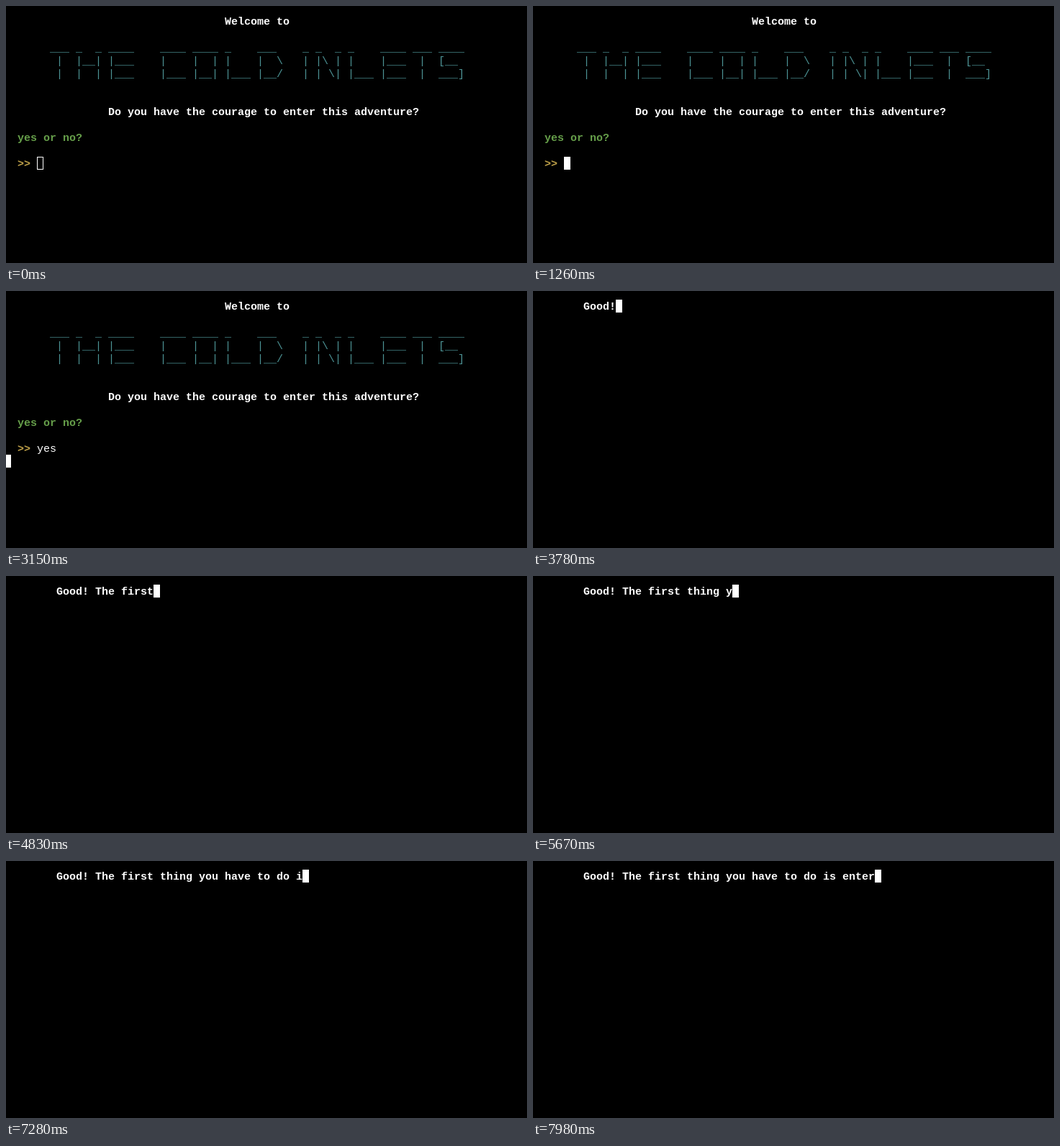
Recreate the animation shown at these times as an HTML page. Size 724x358 px, loop 8000 ms.

```html
<!DOCTYPE html>
<html lang="en">
<head>
<meta charset="utf-8">
<title>Terminal adventure</title>
<style>
  html, body { margin: 0; width: 100%; height: 100%; overflow: hidden; background: #000; }
  svg { display: block; }
  text { font: 15px "Liberation Mono", monospace; white-space: pre; fill: #fff; }
  .bold, .green, .yellow { font-weight: bold; }
  .title { fill: #4c9294; }
  .green { fill: #669f4a; }
  .yellow { fill: #bd9f48; }
</style>
</head>
<body>
<svg id="stage" width="724" height="358" viewBox="0 0 724 358">
  <rect width="724" height="358" fill="#000"/>
  <g id="welcome"><g id="banner" transform="translate(0 1)"></g></g>
  <g id="story"></g>
  <rect id="cursor" stroke="#fff" width="8" height="17"/>
  <path id="pointer" d="M54.5 214.5V229.5L58 226.3L60.4 231.5L62.8 230.4L60.5 225.4H65.5Z"
        fill="#000" stroke="#fff"/>
</svg>
<script>
const LOOP = 8000, CELL_W = 9, CELL_H = 18, LEFT = -2, TOP = 12;
const INDENT = 8;
const STORY = 'Good! The first thing you have to do is enter';

// Moments of the prompt dialogue, in ms
const FOCUS = 1260, POINTER_IN = 1540, POINTER_OUT = 2310;
const KEYS = [2380, 2590, 2940];
const ENTER = 3150, CLEAR = 3220;

// Three rows per banner letter
const GLYPHS = {
  T: ['___', ' | ', ' | '],
  H: ['_  _', '|__|', '|  |'],
  E: ['____', '|___', '|___'],
  C: ['____', '|   ', '|___'],
  O: ['____', '|  |', '|__|'],
  L: ['_   ', '|   ', '|___'],
  D: ['___ ', '|  \\', '|__/'],
  I: ['_', '|', '|'],
  N: ['_  _', '|\\ |', '| \\|'],
  S: ['____', '[__ ', '___]']
};

const byId = id => document.getElementById(id);
const cellX = col => LEFT + col * CELL_W;
const cellY = row => TOP + row * CELL_H;
const show = (node, on) => node.setAttribute('display', on ? 'inline' : 'none');

function print(parent, col, row, content, style = '') {
  const node = document.createElementNS('http://www.w3.org/2000/svg', 'text');
  node.setAttribute('x', cellX(col));
  node.setAttribute('y', cellY(row) + 14);
  node.setAttribute('class', style);
  node.textContent = content;
  parent.append(node);
  return node;
}

function printBanner(col, word) {
  for (let line = 0; line < 3; line++) {
    const content = [...word].map(letter => GLYPHS[letter][line]).join(' ');
    print(byId('banner'), col, 2 + line, content, 'title');
  }
}

const welcome = byId('welcome'), story = byId('story');
const cursor = byId('cursor'), pointer = byId('pointer');

print(welcome, 34, 0, 'Welcome to', 'bold');
printBanner(7, 'THE');
printBanner(24, 'COLD');
printBanner(46, 'INLETS');
print(welcome, 16, 7, 'Do you have the courage to enter this adventure?', 'bold');
print(welcome, 2, 9, 'yes or no?', 'green');
print(welcome, 2, 11, '>>', 'yellow');
const answer = print(welcome, 5, 11, '');
const typed = print(story, INDENT, 0, '', 'bold');

// Columns advance every 70 and 140 ms in turn, with one late key
function columnTime(col) {
  return 3990 + 105 * (col - 15) + (col % 2 ? 0 : 35) + (col === 39 ? 70 : 0);
}

function storyColumn(t) {
  let col = 0;
  for (let next = INDENT; next <= INDENT + STORY.length && t >= columnTime(next); next++) col = next;
  return col;
}

function placeCursor(col, row, filled) {
  cursor.setAttribute('x', cellX(col) + 0.5);
  cursor.setAttribute('y', cellY(row) + 0.5);
  cursor.setAttribute('fill', filled ? '#fff' : 'none');
}

function render(t) {
  const cleared = t >= CLEAR;
  show(welcome, !cleared);
  show(story, cleared);
  show(pointer, t >= POINTER_IN && t < POINTER_OUT);
  if (cleared) {
    const col = storyColumn(t);
    typed.textContent = STORY.slice(0, Math.max(0, col - INDENT));
    placeCursor(col, 0, true);
  } else {
    const keys = KEYS.filter(time => t >= time).length;
    answer.textContent = 'yes'.slice(0, keys);
    if (t >= ENTER) placeCursor(0, 12, true);
    else placeCursor(5 + keys, 11, t >= FOCUS);
  }
}

function tick() {
  render(performance.now() % LOOP);
  requestAnimationFrame(tick);
}
tick();
</script>
</body>
</html>
```
